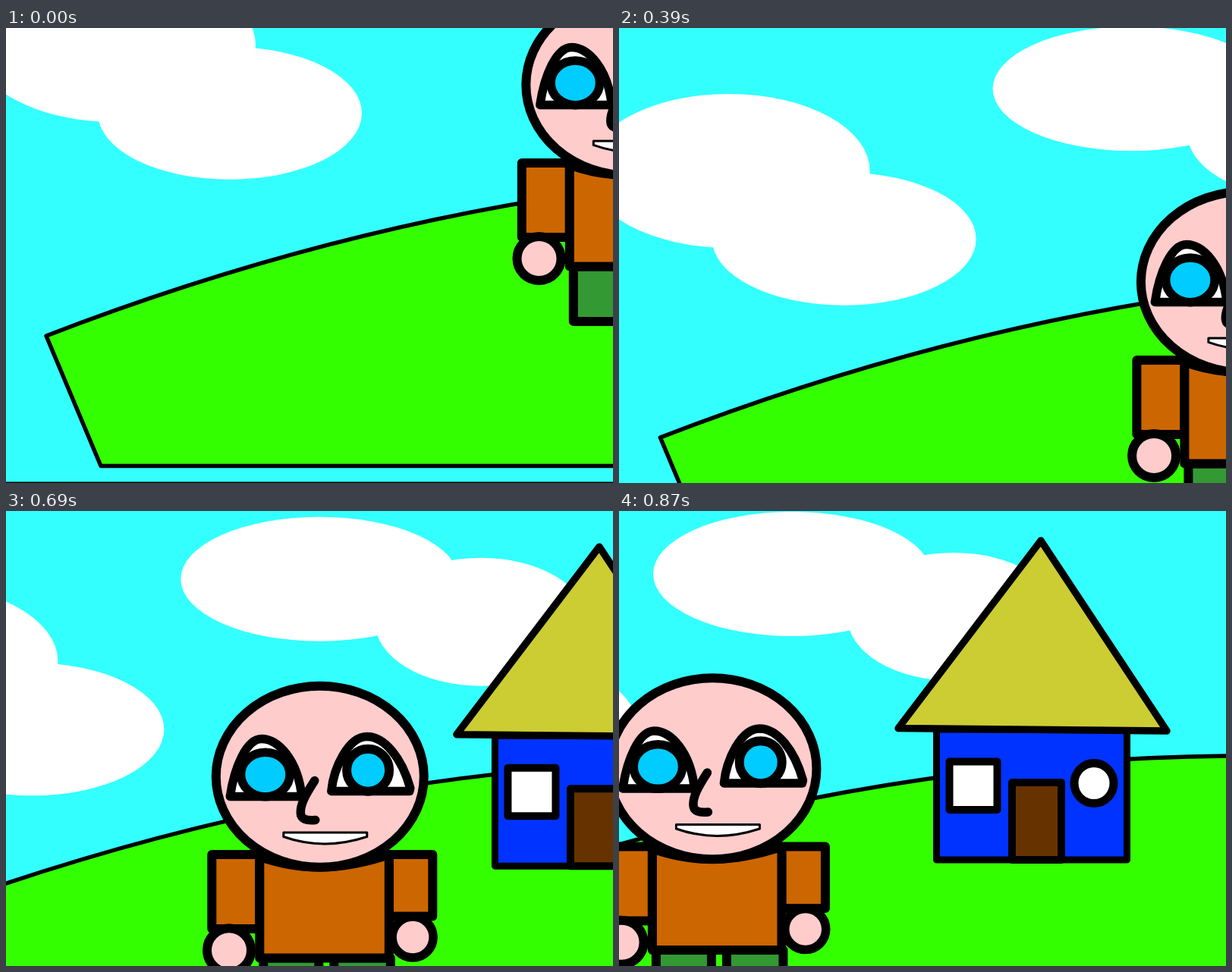
Animation, 800 px wide and 600 px high, one loop 0.9 s. Source, as an HTML page with a canvas:

```html
<!DOCTYPE html>
<html lang="en">
<head>
<meta charset="utf-8">
<title>Hillside pan</title>
<style>
  html, body { margin: 0; width: 100%; height: 100%; overflow: hidden; }
  canvas { display: block; width: 100vw; height: 100vh; }
</style>
</head>
<body>
<canvas id="stage" width="800" height="600"></canvas>
<script>
const ctx = document.getElementById('stage').getContext('2d');
const STEP = 30, STEPS = 30, TURN = 14.5;
const SKIN = '#ffcccc', SHIRT = '#cc6600', PANTS = '#339933', IRIS = '#00ccff';

ctx.lineJoin = ctx.lineCap = 'round';

// The camera tilts up until TURN, then pans right.
function camera(step) {
  if (step <= TURN) return { x: 0.2 * step - 0.7, y: 20 * step };
  const late = step - TURN;
  return { x: 2.2 - 48.4 * late, y: 290 - 1.75 * late };
}

// Draws a parallax layer whose coordinates are the ones seen at step `base`.
function layer(step, base, depth, draw) {
  const now = camera(step), ref = camera(base);
  ctx.save();
  ctx.translate(depth * (now.x - ref.x), depth * (now.y - ref.y));
  draw();
  ctx.restore();
}

function shape(path, fill, width) {
  if (fill) {
    ctx.fillStyle = fill;
    ctx.fill(path);
  }
  if (width) {
    ctx.lineWidth = width;
    ctx.strokeStyle = '#000';
    ctx.stroke(path);
  }
}

function oval(x, y, rx, ry, fill, width) {
  const path = new Path2D();
  path.ellipse(x, y, rx, ry, 0, 0, Math.PI * 2);
  shape(path, fill, width);
}

function box(left, top, right, bottom, fill, width) {
  const path = new Path2D();
  path.rect(left, top, right - left, bottom - top);
  shape(path, fill, width);
}

function draw(d, fill, width) {
  shape(new Path2D(d), fill, width);
}

function sky(step) {
  ctx.fillStyle = '#33ffff';
  ctx.fillRect(0, 0, 800, 600);
  layer(step, 17, 0.4, () => draw('M-50 0.5H850', null, 1.5));
  layer(step, 0, 0.4, () => draw('M-50 599.3H850', null, 1.4));
}

function leftCloud() {
  oval(143, 22.5, 186, 101.5, '#fff');
  oval(295, 112.3, 174, 87.5, '#fff');
}

function rightCloud() {
  oval(228, 83, 183, 82, '#fff');
  oval(441, 139.5, 140, 84.5, '#fff');
}

function hill() {
  draw('M53 406Q621.5 186.5 1190 186.5H1500V577.5H125Z', '#33ff00', 5.4);
}

function house() {
  box(418.5, 288, 669.5, 460, '#0033ff', 9);
  draw('M556 39L368 286.5L722 290Z', '#cccc33', 9.5);
  box(435.5, 330.5, 498.5, 394, '#fff', 10);
  box(518, 358, 583, 460, '#663300', 10);
  oval(626, 359, 26, 26.5, '#fff', 11);
}

function person() {
  box(242.5, 586, 315.5, 658.5, PANTS, 12);
  box(335.5, 586, 410, 658.5, PANTS, 12);
  box(174.5, 449.5, 237.5, 547.5, SHIRT, 12);
  box(408, 449.5, 465.5, 531, SHIRT, 12);
  draw('M237.5 452Q316 481 408 449.5V586H237.5Z', SHIRT, 12);
  oval(197.2, 575.7, 29, 29, SKIN, 12);
  oval(439.3, 558.5, 27, 27, SKIN, 11.5);

  oval(317, 346.7, 137, 119.5, SKIN, 12);
  draw('M198.5 373C204 335 220 297 240 297C262 297 288 325 293 373Z', '#fff', 11.5);
  oval(245, 344, 32.2, 29.3, IRIS, 11.5);
  draw('M332 366C335 336 354 294 379 294C402 294 425 322 436 362L435 366Z', '#fff', 11.5);
  oval(380.3, 338.3, 28, 28, IRIS, 12);
  draw('M310 352C297 372 291 384 291.5 395Q292 406 311 404', null, 11.5);
  draw('M269 420.5H379V426Q350 435.5 323 435.5Q294 435 269 426Z', '#fff', 3);
}

function render(step) {
  sky(step);
  layer(step, 0, 0.638, leftCloud);
  layer(step, 29, 0.638, rightCloud);
  layer(step, 0, 0.515, hill);
  layer(step, 29, 0.778, house);
  layer(step, 25, 1, person);
}

const start = performance.now();
function tick() {
  const elapsed = Math.max(0, performance.now() - start);
  render(Math.floor(elapsed / STEP) % STEPS);
  requestAnimationFrame(tick);
}
tick();
</script>
</body>
</html>
```
